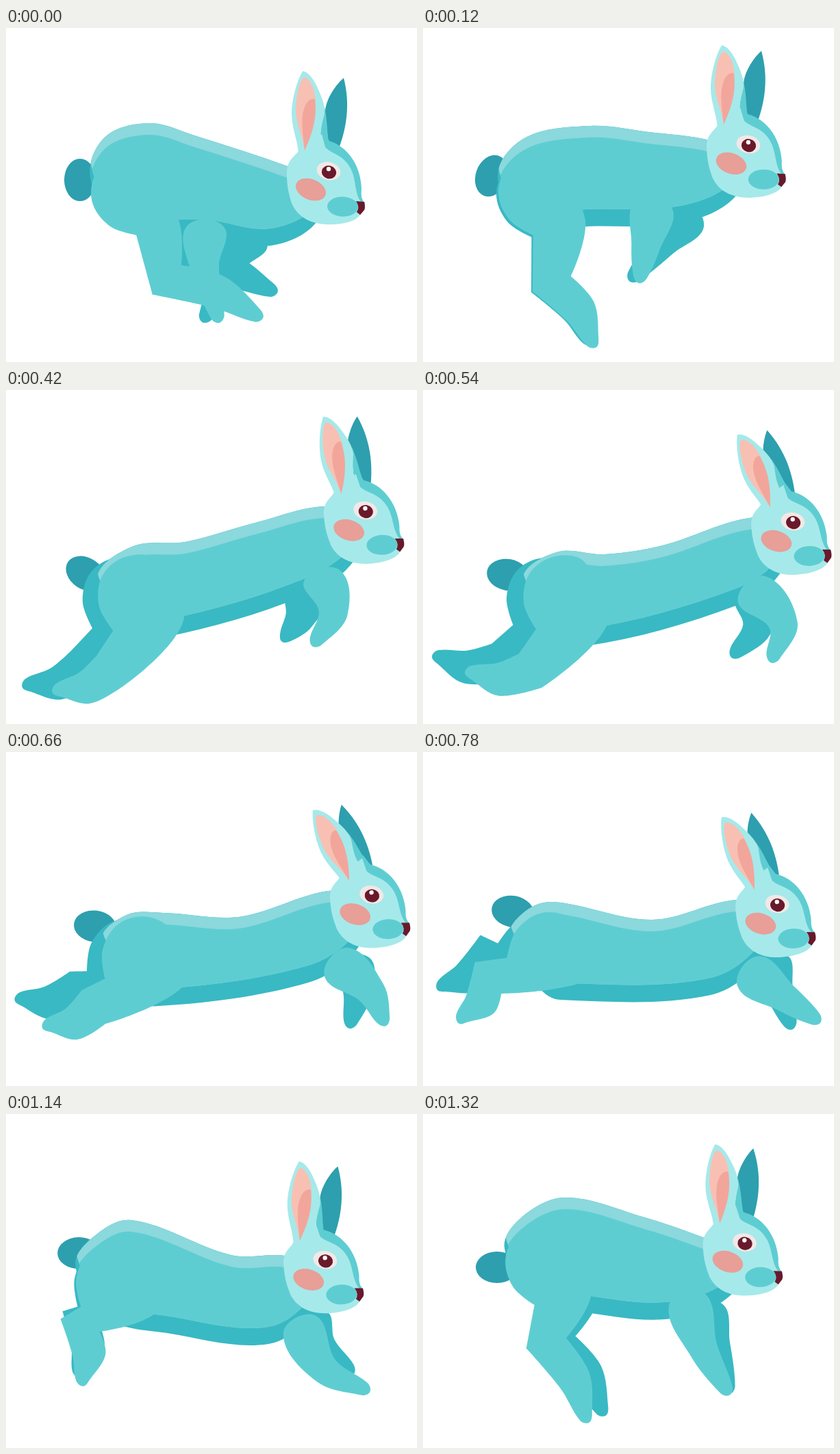
An HTML page with a canvas that plays this animation: 600x488 px, repeating every 1.38 s.

```html
<!DOCTYPE html>
<html lang="en">
<head>
<meta charset="utf-8">
<title>Running rabbit</title>
<style>
  html, body { margin: 0; width: 100%; height: 100%; overflow: hidden; background: #fff; }
  canvas { display: block; }
</style>
</head>
<body>
<canvas id="stage" width="600" height="488"></canvas>
<script>
const ctx = document.getElementById('stage').getContext('2d');
const LOOP = 1380, STEP = 60, RAD = Math.PI / 180;
const MID = '#5ecdd2', DARK = '#39b9c3', BACK = '#8bd8dd', FACE = '#a6e9ea',
      DEEP = '#2d9fae', WINE = '#69192b';

// A pose holds only joints; the outlines are grown from them.
//   back: three points along the spine    belly: front and rear
//   hind: hip, hock, toe                  farHind: hock, toe
//   fore, farFore: shoulder, elbow, paw
//   head: eye x y, tilt, ear swing        tail: x y, tilt
const poses = [];
function pose(t, joints) {
  const p = { t };
  for (const k in joints) p[k] = joints[k].match(/-?[\d.]+/g).map(Number);
  poses.push(p);
}

pose(0, {
  back: '145,159 210,139 275,157', belly: '386,318 300,306',
  hind: '182,240 235,368 367,420', farHind: '250,345 388,383',
  fore: '291,290 290,350 309,422', farFore: '360,300 330,340 291,422',
  head: '471,210 0 0', tail: '108,222 90'
});
pose(120, {
  back: '148,161 244,143 330,152', belly: '380,284 238,290',
  hind: '168,240 188,374 248,459', farHind: '186,375 242,455',
  fore: '337,258 325,320 317,364', farFore: '390,270 350,315 307,363',
  head: '475,171 -2 0', tail: '100,216 110'
});
pose(300, {
  back: '165,212 250,193 370,161', belly: '400,292 227,338',
  hind: '175,290 149,394 92,462', farHind: '121,400 58,466',
  fore: '428,255 408,312 389,346', farFore: '395,290 370,322 361,341',
  head: '502,165 -4 0', tail: '108,256 65'
});
pose(540, {
  back: '195,237 265,240 350,227', belly: '457,315 237,374',
  hind: '204,300 157,410 70,413', farHind: '113,398 22,390',
  fore: '480,290 526,343 511,390', farFore: '485,305 487,350 456,384',
  head: '540,193 -4 23', tail: '124,270 10'
});
pose(780, {
  back: '150,232 190,219 335,245', belly: '420,355 200,362',
  hind: '185,292 95,330 57,389', farHind: '93,296 28,342',
  fore: '475,320 530,360 573,390', farFore: '505,305 520,350 536,397',
  head: '517,223 -4 23', tail: '131,233 10'
});
pose(1020, {
  back: '120,202 172,180 330,237', belly: '400,358 240,342',
  hind: '155,265 78,302 69,360', farHind: '74,284 49,343',
  fore: '445,330 490,388 553,402', farFore: '460,310 478,345 521,366',
  head: '470,230 -4 0', tail: '108,196 5'
});
pose(1320, {
  back: '145,150 208,122 320,150', belly: '362,299 238,290',
  hind: '178,218 180,335 238,443', farHind: '194,334 262,433',
  fore: '385,270 410,345 443,403', farFore: '410,285 428,340 446,400',
  head: '469.5,188.5 -3 2', tail: '108,224 0'
});

// Cyclic key lookup: the index may run past either end.
const N = poses.length;
const key = i => poses[(i + N) % N];
const time = i => key(i).t + Math.floor(i / N) * LOOP;

function slope(i, part, c) {
  const [a, b, d] = [i - 1, i, i + 1].map(j => key(j)[part][c]);
  const l = (b - a) / (time(i) - time(i - 1)), r = (d - b) / (time(i + 1) - time(i));
  const m = (d - a) / (time(i + 1) - time(i - 1));
  const cap = 1.5 * Math.min(Math.abs(l), Math.abs(r)) + 0.1;
  return Math.max(-cap, Math.min(cap, m));
}

function sample(part, t) {
  let i = N - 1;
  while (poses[i].t > t) i--;
  const h = time(i + 1) - time(i), u = (t - time(i)) / h, v = 1 - u;
  return key(i)[part].map((a, c) => {
    const b = key(i + 1)[part][c];
    return a * (1 + 2 * u) * v * v + b * u * u * (3 - 2 * u)
      + h * u * v * (v * slope(i, part, c) - u * slope(i + 1, part, c));
  });
}

const pairs = p => p.flatMap((v, i) => i % 2 ? [] : [[v, p[i + 1]]]);
const unit = ([x, y]) => { const d = Math.hypot(x, y) || 1; return [x / d, y / d]; };
const dir = (a, b) => unit([b[0] - a[0], b[1] - a[1]]);
const turn = (a, b) => unit([a[0] + b[0], a[1] + b[1]]);
// Point reached from p by going along direction d and sideways to its front.
const step = (p, d, along, side) =>
  [p[0] + d[0] * along + d[1] * side, p[1] + d[1] * along - d[0] * side];
const sharp = ([x, y]) => [x, y, true];

// Closed smooth curve; points marked sharp stay corners.
function outline(pts) {
  const n = pts.length, path = new Path2D();
  const at = i => pts[(i + n) % n];
  const tangent = i => at(i)[2] ? [0, 0] : dir(at(i - 1), at(i + 1));
  path.moveTo(at(0)[0], at(0)[1]);
  for (let i = 0; i < n; i++) {
    const [x, y] = at(i), [X, Y] = at(i + 1), [a, b] = tangent(i), [A, B] = tangent(i + 1);
    const k = Math.hypot(X - x, Y - y) / 3;
    path.bezierCurveTo(x + a * k, y + b * k, X - A * k, Y - B * k, X, Y);
  }
  path.closePath();
  return path;
}

function hindLeg(hip, hock, toe) {
  const thigh = dir(hip, hock), foot = dir(hock, toe), bend = turn(thigh, foot);
  const length = Math.hypot(toe[0] - hock[0], toe[1] - hock[1]);
  const angle = Math.atan2(thigh[1], thigh[0]) / RAD;
  const around = (deg, r) =>
    [hip[0] + r * Math.cos((angle + deg) * RAD), hip[1] + r * Math.sin((angle + deg) * RAD)];
  const rump = [190, 145, 100, 55].map(deg => around(deg, 58));
  return outline([
    ...rump,
    sharp(around(15, 63)),
    sharp(step(hock, bend, 0, -30)),
    step(hock, foot, length * 0.55, -13),
    step(toe, foot, 0, -10),
    step(toe, foot, 9, 0),
    step(toe, foot, 0, 10),
    step(hock, foot, length * 0.55, 35),
    sharp(step(hock, bend, 0, 30)),
    [hip[0] + 68, hip[1] + 36]
  ]);
}

function foreLeg([shoulder, elbow, paw]) {
  const upper = dir(shoulder, elbow), lower = dir(elbow, paw);
  const bones = [[shoulder, upper, 27], [elbow, turn(upper, lower), 21], [paw, lower, 10]];
  return outline([
    ...bones.map(([p, d, r]) => step(p, d, 0, -r)),
    step(paw, lower, 9, 0),
    ...bones.reverse().map(([p, d, r]) => step(p, d, 0, r))
  ]);
}

function fill(path, color) {
  ctx.fillStyle = color;
  ctx.fill(path);
}

function oval(x, y, rx, ry, deg, color) {
  const path = new Path2D();
  path.ellipse(x, y, rx, ry, deg * RAD, 0, 7);
  fill(path, color);
}

function place(x, y, deg, draw) {
  ctx.save();
  ctx.translate(x, y);
  ctx.rotate(deg * RAD);
  draw();
  ctx.restore();
}

// Ears start at their base, the other head shapes at the eye.
const shape = {
  farEar: 'M0 3C12 -28 18 -63 8 -102C-2 -94 -20 -70 -19 -50L-14 -2Z',
  ear: 'M-9 8C-9 -14 -19 -30 -19 -55C-18 -80 -10 -104 -3 -116C6 -115 14 -103 20 -89C25 -78 30 -66 29 -54C26 -40 20 -28 26 -2L20 12Z',
  earSide: 'M29 -64C34 -40 32 -28 36 -8L30 0L24 -8C21 -28 26 -40 29 -64Z',
  earPink: 'M0 0C-4 -28 -13 -36 -13 -62C-11 -90 -6 -103 -1 -107C8 -105 15 -92 16 -71Z',
  earInner: 'M0 0C-2 -20 -5 -38 -3 -51C-1 -66 6 -78 15 -75C18 -52 14 -30 0 0Z',
  skull: 'M-9 -60L1 -45C27 -37 47 -10 48 25C47 36 48 40 53 46L43 52L-11 -10Z',
  face: 'M-42 -34C-47 -22 -61 -20 -61 2C-61 25 -57 35 -54 46C-45 67 -25 77 1 77C25 77 43 71 47 61L47 44C37 30 41 12 32 -5C21 -26 3 -26 -5 -36L-10 -55Z',
  nose: 'M40 43L52 44Q54 52 52 56L46 63L41 59Q46 52 40 43Z'
};
for (const k in shape) shape[k] = new Path2D(shape[k]);

function drawTorso(t, hip, [ex, ey]) {
  const [hx, hy] = hip;
  const body = [
    [hx - 59, hy - 22], ...pairs(sample('back', t)),
    [ex - 57, ey - 7], [ex - 10, ey + 15], [ex - 18, ey + 74],
    ...pairs(sample('belly', t)), [hx - 15, hy + 53]
  ];
  const moved = dy => outline(body.map(([x, y]) => [x, y + dy]));
  const whole = moved(0), upper = moved(-25);
  ctx.save();
  fill(whole, DARK);
  ctx.clip(whole);
  fill(upper, BACK);
  ctx.clip(upper);
  fill(moved(17), MID);
  ctx.restore();
}

function drawHead(swing, tilt) {
  const ear = draw => place(-35 + swing * 0.15, -31 + swing * 0.3, -swing - tilt, draw);
  ear(() => fill(shape.earSide, MID));
  fill(shape.skull, MID);
  ear(() => fill(shape.ear, FACE));
  fill(shape.face, FACE);
  oval(-26, 26, 23, 15, 22, '#e79f98');
  fill(shape.nose, WINE);
  oval(20.5, 51, 22.5, 14.5, 2, MID);
  oval(0, -1, 17.5, 13, 15, '#f3e8e6');
  oval(0.5, 0.7, 10.7, 9.5, 15, WINE);
  oval(0, -4, 3.2, 3.2, 0, '#fff');
  ear(() => {
    fill(shape.earPink, '#f8c0b3');
    fill(shape.earInner, '#f2a69b');
  });
}

function draw(t) {
  const [hip, hock, toe] = pairs(sample('hind', t));
  const [farHock, farToe] = pairs(sample('farHind', t));
  const farHip = [hip[0] + (farToe[0] - toe[0]) / 2, hip[1] + 3];
  const [ex, ey, tilt, swing] = sample('head', t);
  const [tx, ty, tailTilt] = sample('tail', t);

  ctx.fillStyle = '#fff';
  ctx.fillRect(0, 0, 600, 488);
  place(ex, ey, tilt, () =>
    place(14 - swing * 0.4, -35 - swing * 0.2, -swing * 1.1 - tilt / 2, () => fill(shape.farEar, DEEP)));
  oval(tx, ty, 31, 23, tailTilt, DEEP);
  fill(foreLeg(pairs(sample('farFore', t))), DARK);
  fill(hindLeg(farHip, farHock, farToe), DARK);
  drawTorso(t, hip, [ex, ey]);
  fill(hindLeg(hip, hock, toe), MID);
  fill(foreLeg(pairs(sample('fore', t))), MID);
  place(ex, ey, tilt, () => drawHead(swing, tilt));
}

const start = performance.now();
function tick() {
  const t = (performance.now() - start) % LOOP;
  draw(Math.floor(t / STEP) * STEP);
  requestAnimationFrame(tick);
}
tick();
</script>
</body>
</html>
```
